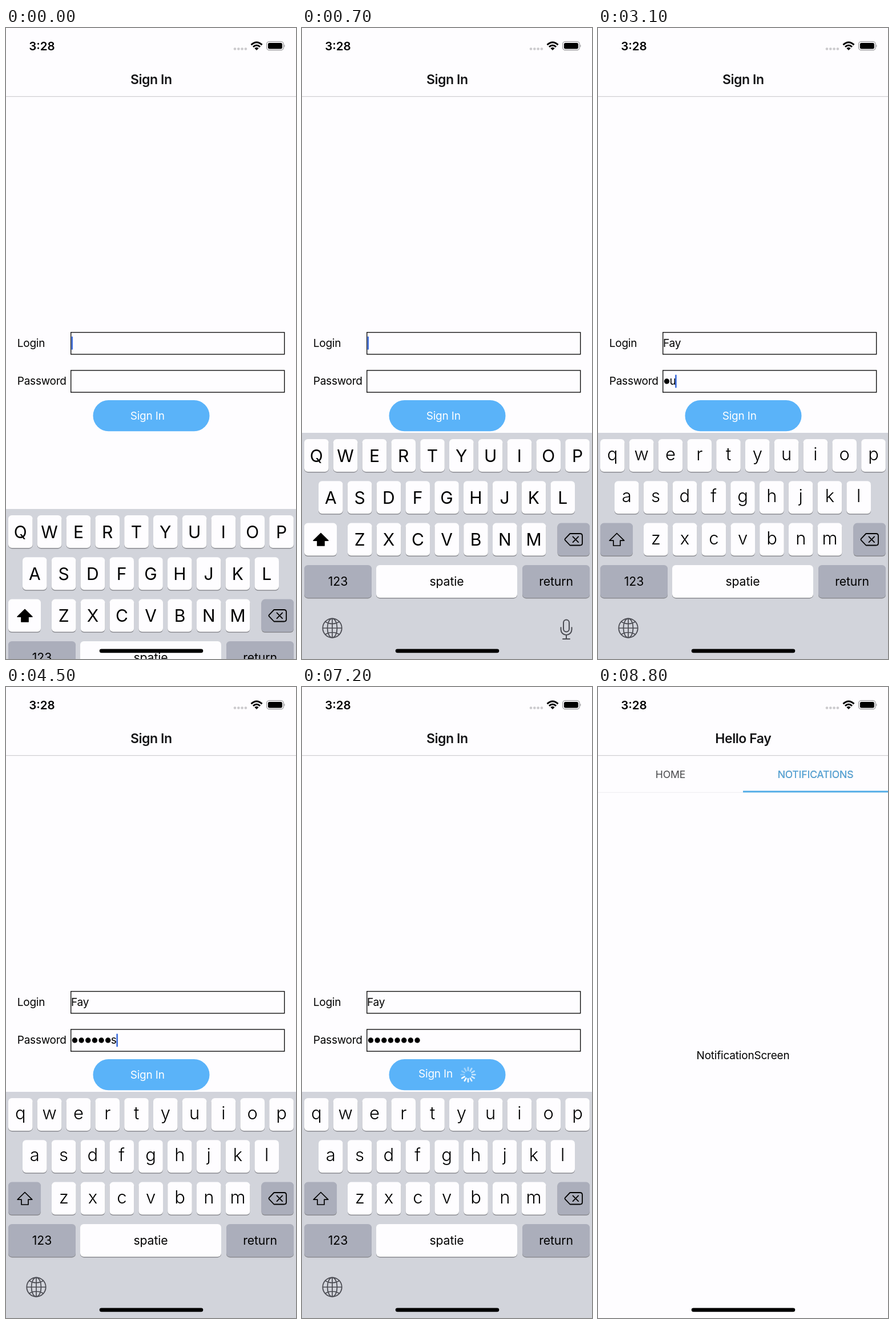
Animation, 508 px wide and 1102 px high, one loop 8.9 s. Source, as an HTML page:

```html
<!DOCTYPE html>
<html lang="nl">
<head>
<meta charset="utf-8">
<title>Sign In</title>
<style>
  html, body { margin: 0; width: 100%; height: 100%; overflow: hidden; background: #fefdff; }
  svg { display: block; width: 508px; height: 1102px; font-family: Inter, sans-serif; }
</style>
</head>
<body>
<svg id="stage" viewBox="0 0 508 1102"></svg>
<script>
const LOOP = 8900, STEP = 100;
const USER = 'Fay', PASSWORD = 'sunhouse';
const KEY_TIMES = [2800, 3100, 3200, 3600, 4000, 4200, 4500, 4900];
const BLUE = '#5ab3f9', BACKGROUND = '#fefdff';
const stage = document.getElementById('stage');

const clamp = x => Math.min(1, Math.max(0, x));
const during = (t, from, to) => t >= from && t < to;
// Remaining distance of a critically damped spring after `ms`.
const spring = ms => { const x = Math.max(0, ms) * 0.02; return (1 + x) * Math.exp(-x); };

const rect = (x, y, w, h, fill, rx = 0, more = '') =>
  `<rect x="${x}" y="${y}" width="${w}" height="${h}" rx="${rx}" fill="${fill}" ${more}/>`;
const circle = (x, y, r, fill) => `<circle cx="${x}" cy="${y}" r="${r}" fill="${fill}"/>`;
const path = (d, color, width, more = '') =>
  `<path d="${d}" fill="none" stroke="${color}" stroke-width="${width}" ${more}/>`;
const text = (s, x, y, size, { fill = '#000', weight = 400, anchor = 'middle', gap = 0 } = {}) =>
  `<text x="${x}" y="${y}" font-size="${size}" fill="${fill}" font-weight="${weight}" ` +
  `text-anchor="${anchor}" letter-spacing="${gap}">${s}</text>`;
const body = (s, x, y, fill) => text(s, x, y, 19, { fill, gap: -0.2 });
const leftBody = (s, x, y) => text(s, x, y, 19, { anchor: 'start', gap: -0.25 });

function statusBar() {
  return text('3:28', 63, 38.7, 20.5, { weight: 600 }) +
    [401, 407.3, 413.6, 419.9].map(x => circle(x, 36.5, 2.3, '#cbcacd')).join('') +
    path('M429.5 29.3Q439 20.7 448.5 29.3M432.9 33Q439 27.6 445.1 33', '#000', 3) +
    '<path d="M435.3 35.2Q439 32.2 442.7 35.2L439 39z"/>' +
    rect(456.6, 23.7, 29.6, 15, 'none', 4.6, 'stroke="#9b9a9d" stroke-width="1.3"') +
    rect(458.9, 26, 25, 10.4, '#000', 2.6) +
    '<path d="M487.3 28.8q2.6 2.4 0 4.9z" fill="#9b9a9d"/>';
}

function header(title) {
  return text(title, 254.3, 97.5, 23, { weight: 600, fill: '#141416', gap: -0.45 }) +
    rect(0, 119, 508, 1.2, '#cfced1');
}

function caret(x, y, opacity) {
  return rect(x, y, 2.7, 23, '#4270dc', 1, `opacity="${opacity}"`);
}

function loginCaret(t) {
  if (t < 500 || during(t, 700, 1800)) return 1;
  return t === 500 || t === 1800 ? 0.75 : 0;
}

function passwordCaret(t) {
  if (during(t, 2500, 5500) || during(t, 5900, 6300)) return 1;
  return t === 5500 ? 0.5 : 0;
}

function passwordField(t) {
  const pitch = 11.65, left = 114.6;
  const typed = KEY_TIMES.filter(k => k <= t).length;
  const revealed = typed > 0 && t < 5200;
  const hidden = typed - revealed;
  const end = left + hidden * pitch;
  let out = '';
  for (let i = 0; i < hidden; i++) out += circle(left + (i + 0.5) * pitch, 617, 4.7, '#000');
  if (revealed) out += leftBody(PASSWORD[hidden], end - 0.8, 623);
  return out + caret(end + (revealed ? 8.8 : 0), 605.5, passwordCaret(t));
}

function spinner(t) {
  const head = Math.floor((t - 6500) / 1000 * 12);
  let out = '';
  for (let i = 0; i < 12; i++) {
    const age = ((head - i) % 12 + 12) % 12;
    out += path('M0 -7.3V-12.4', '#fff', 2.7, `stroke-linecap="round" ` +
      `opacity="${1 - age * 0.065}" transform="translate(291 677) rotate(${i * 30})"`);
  }
  return out;
}

function signIn(t) {
  const loading = t >= 6500;
  const opacity = 1 - 0.8 * clamp((t - 5850) / 150) * (1 - clamp((t - 6050) / 250));
  const field = y => rect(113.7, y, 374, 38.2, BACKGROUND, 0, 'stroke="#111" stroke-width="1.4"');
  return header('Sign In') +
    leftBody('Login', 19.8, 556.5) + field(531.6) +
    leftBody('Password', 19.8, 623) + field(598) +
    (t >= 1200 ? leftBody(USER, 114, 557) : '') +
    caret(t >= 1200 ? 145 : 114.4, 538.8, loginCaret(t)) +
    passwordField(t) +
    `<g opacity="${opacity}">` + rect(152.5, 650, 204, 54.3, BLUE, 27.1) +
    (loading ? body('Sign In', 234, 682, '#fff') + spinner(t) : body('Sign In', 247.7, 684, '#fff')) +
    '</g>';
}

function home(t) {
  const p = 1 - (1 - clamp((t - 8550) / 250)) ** 2;
  const tab = (label, x, active) => [['#48484b', 1], ['#57afe8', active]].map(([fill, opacity]) =>
    `<g opacity="${opacity}">${text(label, x, 158.6, 17.6, { fill, gap: -0.15 })}</g>`).join('');
  const tabs = t < 7400 ? '' :
    tab('HOME', 127, 1 - p) + tab('NOTIFICATIONS', 381, p) +
    rect(0, 183.6, 508, 1, '#ececef') + rect(254 * p, 181.2, 254, 3, '#57afe8');
  return header('Hello ' + USER) + tabs +
    body('HomeScreen', 254 - 508 * p, 649.5) +
    body('NotificationScreen', 762 - 508 * p, 649.5);
}

function keyCap(x, y, w, grey) {
  return rect(x, y + 1.4, w, 57, '#8b8c91', 6.2) + rect(x, y, w, 57, grey ? '#abaebb' : BACKGROUND, 6.2);
}

function keyboard(t, top) {
  const upper = t < 1200;
  const letters = (chars, x0, y) => [...chars].map((c, i) => {
    const x = x0 + i * 50.8;
    return keyCap(x, y, 42.6) + (upper
      ? text(c, x + 21.3, y + 39.8, 30)
      : text(c.toLowerCase(), x + 21.3, y + 37, 31, { weight: 350 }));
  }).join('');
  const wordKey = (label, x, w, grey) =>
    keyCap(x, 231, w, grey) + text(label, x + w / 2, 266.5, 21.2, { gap: -0.1 });
  const ink = '#4b4c53';
  const mic = path('M453.5 340v3.5a9.5 9.5 0 0 0 19 0V340M463 353.5v6.5M457 360h12', ink, 2, 'stroke-linecap="round"') +
    rect(458, 326.5, 10, 21, 'none', 5, `stroke="${ink}" stroke-width="2"`);
  const globe = path('M53 324.5v33M36 341h34M40 329.5Q53 337.5 66 329.5M40 352.5Q53 344.5 66 352.5', ink, 1.7) +
    `<g fill="none" stroke="${ink}" stroke-width="1.8"><circle cx="53" cy="341" r="16.7"/>` +
    '<ellipse cx="53" cy="341" rx="8.5" ry="16.7"/></g>';
  return `<g transform="translate(0 ${top})">` + rect(0, 0, 508, 400, '#d2d4db') +
    letters('QWERTYUIOP', 4, 11) + letters('ASDFGHJKL', 29, 84.3) + letters('ZXCVBNM', 80, 157.6) +
    keyCap(4, 157.6, 57, !upper) + keyCap(447.5, 157.6, 56.5, true) +
    `<path d="M33 175.5L45.8 188.2H39V197H27V188.2H20.2z" fill="${upper ? '#000' : 'none'}" ` +
    'stroke="#000" stroke-width="1.7" stroke-linejoin="round"/>' +
    path('M469.5 176H487q4 0 4 4v12.5q0 4 -4 4H469.5L461 187.6q-1.2 -1.4 0 -2.8z' +
      'M474.5 181.3l9.6 9.8m0 -9.8l-9.6 9.8', '#000', 1.8, 'stroke-linecap="round" stroke-linejoin="round"') +
    wordKey('123', 4, 118, true) + wordKey('spatie', 130, 247) + wordKey('return', 386, 118, true) +
    globe + (t < 2500 ? mic : '') + '</g>';
}

function keyboardTop(t) {
  return Math.round(t < 7300
    ? 707 + 395 * spring(t + 113.5)
    : 1102 - 395 * spring(t - 7250));
}

function render(t) {
  const top = keyboardTop(t);
  stage.innerHTML = rect(0, 0, 508, 1102, BACKGROUND) + statusBar() +
    (t < 7300 ? signIn(t) : home(t)) +
    (top < 1102 ? keyboard(t, top) : '') +
    rect(163.7, 1084.4, 181.6, 6.8, '#000', 3.4);
}

let shown = -1;
function tick() {
  const t = Math.floor(performance.now() % LOOP / STEP) * STEP;
  if (t !== shown) render(shown = t);
  requestAnimationFrame(tick);
}
tick();
</script>
</body>
</html>
```
